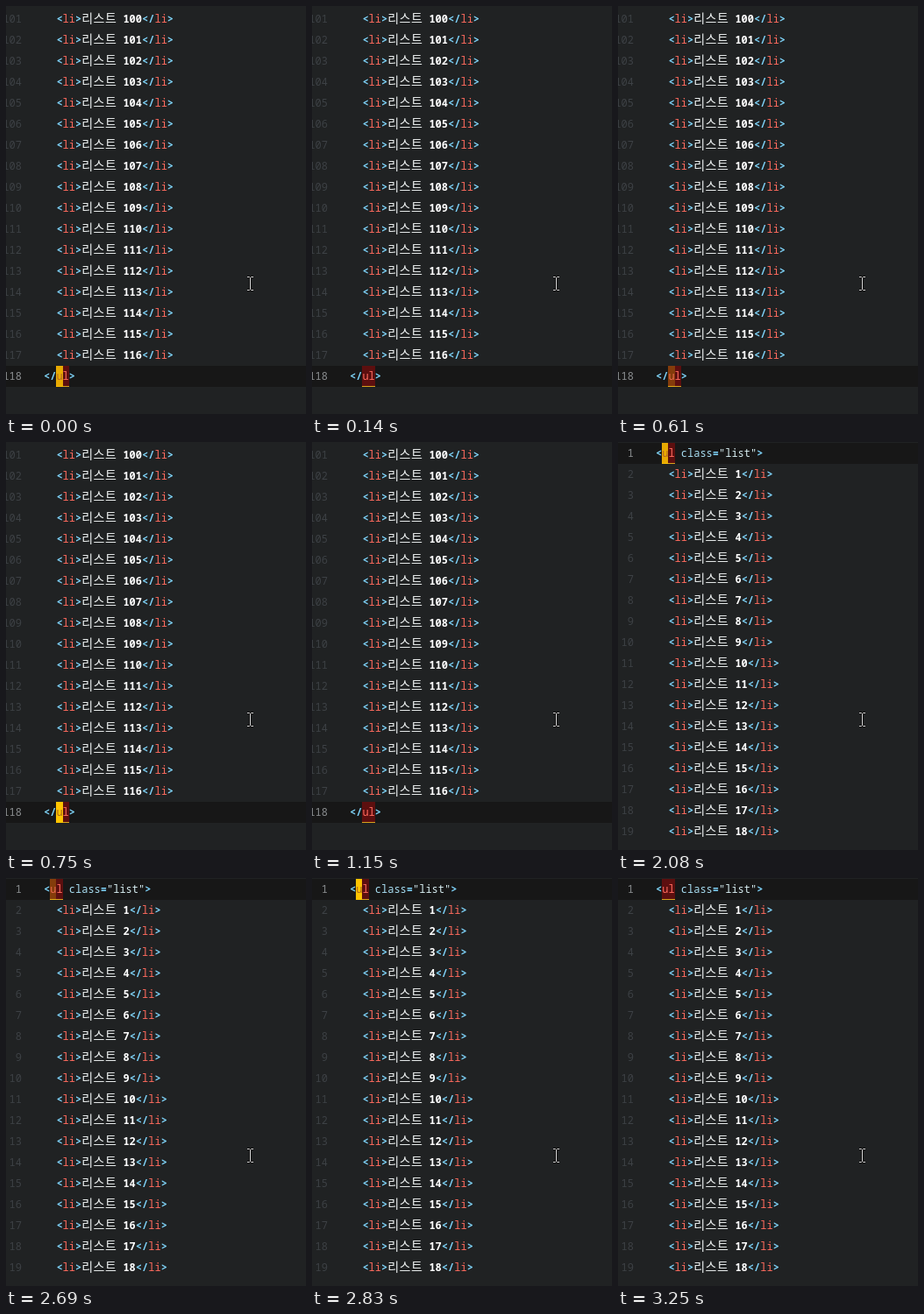
Animation, 342 px wide and 466 px high, one loop 3.65 s. Source, as an HTML page:

```html
<!DOCTYPE html>
<html lang="ko">
<head>
<meta charset="utf-8">
<title>List editor</title>
<style>
  html, body { margin: 0; width: 100%; height: 100%; overflow: hidden; background: #202223; }
  #stage { position: relative; width: 342px; height: 466px; overflow: hidden; }
  .view { position: absolute; inset: 0; animation: 3650ms step-end infinite; }
  #tail { top: 3px; animation-name: tail; }
  #head { top: 1px; animation-name: head; }
  .row {
    position: relative; height: 24px; padding-left: 43px; white-space: pre;
    font: 500 12px/24px "Noto Sans Mono", monospace; color: #fff;
  }
  .row.on { background: #171717; }
  .no { position: absolute; right: calc(100% - 18px); font-weight: 400; color: #3d4145; }
  .on .no { color: #8c8f91; }
  .p { color: #7fd4fb; font-weight: 600; }
  .t { color: #ff6b5e; font-weight: 400; }
  .a { color: #a9def2; }
  .s { color: #d8eef2; }
  .n { font-weight: 600; }
  .ko { font: 400 14px/1 "Noto Sans CJK KR", "Noto Sans CJK", sans-serif; letter-spacing: .45px; color: #f0f4f4; }
  .match {
    position: relative; display: inline-block; height: 24px; vertical-align: top;
    background: #5c0f0f; box-shadow: inset 0 -1px #d9a21c;
  }
  .caret {
    position: absolute; left: 0; top: 0; height: 24px; background: #ffc400; color: #a9641a;
    animation: blink 3650ms step-end infinite;
  }
  #mouse { position: absolute; left: 273px; top: 308px; }

  @keyframes tail { 0% { visibility: visible } 38.904%, 100% { visibility: hidden } }
  @keyframes head { 0% { visibility: hidden } 38.904%, 100% { visibility: visible } }
  @keyframes blink {
    0% { opacity: .86 } 1.918% { opacity: .3 } 3.836% { opacity: 0 }
    16.712% { opacity: .25 } 18.63% { opacity: .8 } 20.548% { opacity: 1 }
    27.945% { opacity: .86 } 29.726% { opacity: .3 } 31.507% { opacity: 0 }
    38.904% { opacity: 1 }
    56.986% { opacity: .86 } 58.904% { opacity: .3 } 60.822% { opacity: 0 }
    73.699% { opacity: .25 } 75.616% { opacity: .8 } 77.534% { opacity: 1 }
    85.205% { opacity: .86 } 87.123% { opacity: .3 } 89.041%, 100% { opacity: 0 }
  }
</style>
</head>
<body>
<div id="stage">
  <div class="view" id="tail"></div>
  <div class="view" id="head"></div>
  <svg id="mouse" width="11" height="18" fill="none">
    <path id="beam" d="M2 1.5H4.5L5.5 2.5L6.5 1.5H9M5.5 2.5V15.5M2 16.5H4.5L5.5 15.5L6.5 16.5H9" stroke="#111" stroke-width="3"/>
    <use href="#beam" style="stroke:#d8d8d8"/>
    <path d="M2 1.5H4.5L5.5 2.5L6.5 1.5H9M5.5 2.5V15.5M2 16.5H4.5L5.5 15.5L6.5 16.5H9" stroke="#d8d8d8"/>
  </svg>
</div>
<script>
  const span = (cls, text) => `<span class="${cls}">${text}</span>`;
  const row = (no, code, on = "") => `<div class="row ${on}">${span("no", no)}${code}</div>`;
  const open = span("p", "&lt;"), shut = span("p", "&lt;/"), end = span("p", "&gt;");
  const li = span("t", "li");
  const ul = span("match t", "ul" + span("caret", "u"));

  const item = n => "  " + open + li + end + span("ko", "리스트") + span("n", " " + n) + shut + li + end;
  const items = (first, last) => {
    let html = "";
    for (let n = first; n <= last; n++) html += row(n + 1, item(n));
    return html;
  };

  document.getElementById("tail").innerHTML =
    items(100, 116) + row(118, shut + ul + end, "on");
  document.getElementById("head").innerHTML =
    row(1, open + ul + span("a", " class") + span("p", "=") + span("s", '"list"') + end, "on") + items(1, 18);
</script>
</body>
</html>
```
